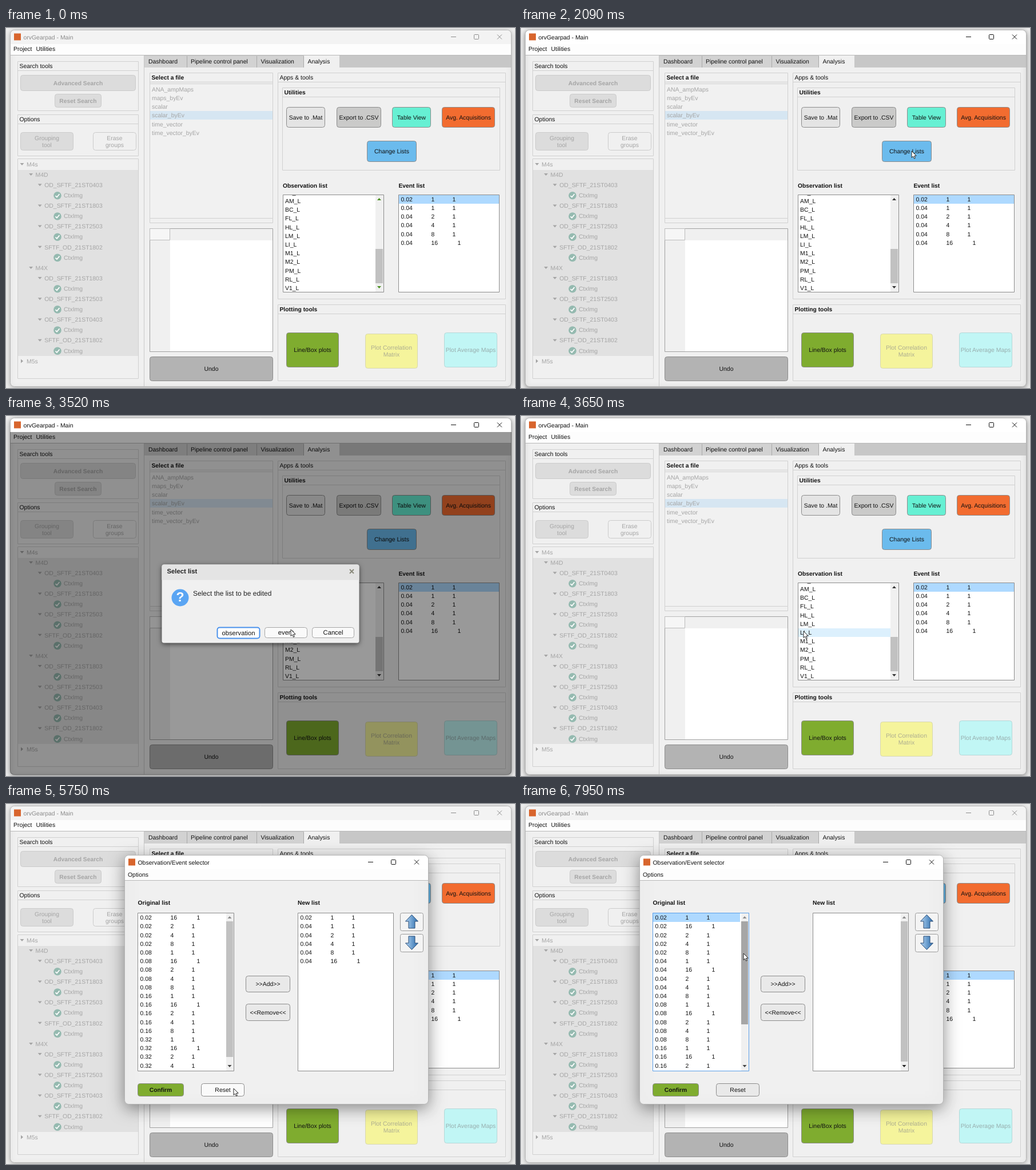
An HTML page with a canvas for the animation above (8000 ms loop, 890 by 629 pixels).

```html
<!DOCTYPE html>
<html lang="en">
<head>
<meta charset="utf-8">
<style>
html, body { margin: 0; width: 100%; height: 100%; overflow: hidden; background: #eee; }
canvas { display: block; }
</style>
</head>
<body>
<canvas id="stage" width="890" height="629"></canvas>
<script>
const ctx = document.getElementById('stage').getContext('2d');
const LOOP = 8000, ROW = 15.2, STEP = 1000 / 15;
const FONT = '"Liberation Sans", Arial, sans-serif';
const GREY = '#a5a5a5', LINE = '#d0d0d0', EDGE = '#8c8c8c', BODY = '#f0f0f0';
const PICKED = '#aed9ff', HOVER = '#dcf0fd', GREEN = '#7fac2f';

// Moments at which the interface changes
const ACTIVE = 2090, ASK = 2230, ANSWER = 3650, OPEN = 3860, RESET_FOCUS = 5950,
      RESET = 6020, PICK = 7220, SCROLL = 7950;

// Pointer path: time, x, y
const path = [
  [560, 726, 612], [760, 724, 452], [900, 721, 360], [1020, 718, 312], [1085, 716, 294],
  [1285, 702, 229], [1485, 683, 215], [2420, 683, 215], [2700, 640, 258], [3000, 566, 325],
  [3240, 515, 363], [3550, 494, 376], [4200, 494, 376], [4480, 556, 195], [4660, 535, 101],
  [5010, 432, 356], [5400, 418, 420], [5680, 398, 497], [5880, 390, 496], [6370, 390, 496],
  [6680, 279, 428], [6750, 278, 424], [7200, 295, 322], [7285, 305, 328], [SCROLL, 305, 328]
];

function pointerAt(time) {
  if (time >= SCROLL) return [389, 261];
  if (time < 555) return [-99, -99];
  const t = Math.max(path[0][0], Math.floor((time - 20) / STEP) * STEP + 20);
  const i = Math.max(1, path.findIndex(p => p[0] >= t));
  const [t0, x0, y0] = path[i - 1], [t1, x1, y1] = path[i];
  const k = (t - t0) / (t1 - t0);
  return [Math.round(x0 + (x1 - x0) * k), Math.round(y0 + (y1 - y0) * k)];
}

function text(s, x, y, { color = '#111', bold = false, align = 'left', size = bold ? 10.3 : 10.45 } = {}) {
  ctx.font = `${bold ? 'bold ' : ''}${size}px ${FONT}`;
  ctx.textAlign = align;
  ctx.textRendering = 'geometricPrecision';
  ctx.fillStyle = color;
  ctx.fillText(s, x, y + 3.7);
}

function fill(x0, y0, x1, y1, color) {
  ctx.fillStyle = color;
  ctx.fillRect(x0, y0, x1 - x0, y1 - y0);
}

function box(x0, y0, x1, y1, color, edge = LINE, radius = 0, width = 1) {
  ctx.beginPath();
  ctx.roundRect(x0 + .5, y0 + .5, x1 - x0 - 1, y1 - y0 - 1, radius);
  if (color) { ctx.fillStyle = color; ctx.fill(); }
  if (edge) { ctx.strokeStyle = edge; ctx.lineWidth = width; ctx.stroke(); }
}

function poly(points, color, edge, width = 1) {
  ctx.beginPath();
  points.forEach(([x, y]) => ctx.lineTo(x, y));
  ctx.closePath();
  if (color) { ctx.fillStyle = color; ctx.fill(); }
  if (edge) { ctx.strokeStyle = edge; ctx.lineWidth = width; ctx.stroke(); }
}

function stroke(color, width, ...lines) {
  ctx.beginPath();
  for (const [first, ...rest] of lines) {
    ctx.moveTo(...first);
    rest.forEach(p => ctx.lineTo(...p));
  }
  ctx.strokeStyle = color;
  ctx.lineWidth = width;
  ctx.stroke();
}

function button(label, x0, y0, x1, y1, color, { edge = EDGE, width, ...style } = {}) {
  box(x0, y0, x1, y1, color, edge, 4, width);
  const lines = label.split('\n');
  lines.forEach((s, i) => text(s, (x0 + x1) / 2, (y0 + y1) / 2 + (i - (lines.length - 1) / 2) * 12,
    { align: 'center', ...style }));
}

function panel(title, x0, y0, x1, y1, bold) {
  box(x0, y0, x1, y1, null);
  fill(x0, y0 + 16, x1, y0 + 17, LINE);
  text(title, x0 + 3.5, y0 + 8.5, { bold });
}

function frame(x0, y0, x1, y1, title, active, menuY, blur) {
  ctx.save();
  ctx.shadowColor = `rgba(0,0,0,${active ? .42 : .25})`;
  ctx.shadowBlur = blur;
  ctx.shadowOffsetY = blur / 4;
  box(x0, y0, x1, y1, BODY, '#b4b4b4', 7);
  ctx.restore();
  ctx.save();
  ctx.beginPath();
  ctx.roundRect(x0 + 1, y0 + 1, x1 - x0 - 2, y1 - y0 - 2, 7);
  ctx.clip();
  fill(x0, y0, x1, y0 + 25, active ? '#fff' : '#f3f3f3');
  fill(x0, y0 + 25, x1, menuY, '#fdfdfd');
  fill(x0, menuY, x1, menuY + 1, '#b8b8b8');
  ctx.restore();
  const y = y0 + 12.5, ink = active ? '#111' : '#8b8b8b', cx = x1 - 21;
  fill(x0 + 7, y - 6, x0 + 19, y + 6, '#d8652d');
  text(title, x0 + 23.5, y + .5, { color: ink });
  stroke(ink, 1, [[cx - 85, y], [cx - 76, y]], [[cx - 4, y - 4], [cx + 4, y + 4]], [[cx + 4, y - 4], [cx - 4, y + 4]]);
  box(cx - 45, y - 4.5, cx - 36, y + 4.5, null, ink, 1);
}

const triangle = (x, y, dir, color) => poly([[x - 3.5, y - 2 * dir], [x + 3.5, y - 2 * dir], [x, y + 2 * dir]], color);

function scrollbar(x0, y0, x1, y1, from, to, up, down, thumb = '#c1c1c1') {
  fill(x0, y0, x1, y1, BODY);
  fill(x0, from, x1 - 1, to, thumb);
  triangle((x0 + x1) / 2 - .5, y0 + 7, -1, up);
  triangle((x0 + x1) / 2 - .5, y1 - 8, 1, down);
}

function eventRow([level, rate, flag], x, y) {
  text(level, x, y);
  text(rate, x + 53, y);
  text(flag, x + (rate > 9 ? 99 : 90), y);
}

function listRows(rows, x0, x1, top, pointer, picked, draw) {
  const [px, py] = pointer, hovered = px >= x0 && px < x1 ? Math.floor((py - top) / ROW) : -1;
  rows.forEach((row, i) => {
    const y = top + i * ROW, color = i === picked ? PICKED : i === hovered ? HOVER : null;
    if (color) fill(x0, Math.round(y), x1, Math.round(y + ROW), color);
    draw(row, x0 + 3.5, y + ROW / 2);
  });
}

const rates = [1, 16, 2, 4, 8];
const allEvents = ['0.02', '0.04', '0.08', '0.16', '0.32'].flatMap(level => rates.map(rate => [level, rate, 1]));
const newEvents = [['0.02', 1, 1], ...[1, 2, 4, 8, 16].map(rate => ['0.04', rate, 1])];
const restEvents = allEvents.filter(([level, rate]) => level !== '0.04' && !(level === '0.02' && rate === 1));
const areas = ['AM', 'BC', 'FL', 'HL', 'LM', 'LI', 'M1', 'M2', 'PM', 'RL', 'V1'].map(s => s + '_L');
const files = ['ANA_ampMaps', 'maps_byEv', 'scalar', 'scalar_byEv', 'time_vector', 'time_vector_byEv'];

const sessions = dates => [...dates.map(d => 'OD_SFTF_21ST' + d), 'SFTF_OD_21ST1802']
  .flatMap(s => [[2, s], [3, 'CtxImg']]);
const tree = [[0, 'M4s'], [1, 'M4D'], ...sessions(['0403', '1803', '2503']),
  [1, 'M4X'], ...sessions(['1803', '2503', '0403']), [0, 'M5s']];

function sidebar() {
  const off = { color: GREY, edge: '#cbcbcb' };
  panel('Search tools', 20, 58, 232, 145);
  button('Advanced Search', 25, 82, 227, 110, '#dcdcdc', { ...off, bold: true });
  button('Reset Search', 85, 115, 167, 139, '#dcdcdc', { ...off, bold: true });
  panel('Options', 20, 151, 232, 224);
  button('Grouping\ntool', 25, 182, 118, 214, '#dcdcdc', off);
  button('Erase\ngroups', 152, 182, 228, 214, BODY, off);
  box(20, 228, 232, 613, BODY);
  fill(21, 248, 231, 573, '#e1e1e1');
  tree.forEach(([depth, label], i) => {
    const y = 238 + i * 18.1, x = 28 + depth * 15.6;
    if (depth === 3) {
      ctx.beginPath();
      ctx.arc(90, y + .5, 6.8, 0, 7);
      ctx.fillStyle = '#95bab0';
      ctx.fill();
      stroke('#fff', 1.7, [[86.5, y + .8], [89, y + 3.2], [93.5, y - 2.3]]);
      text(label, 101, y, { color: GREY });
      return;
    }
    if (label === 'M5s') poly([[26, y - 3.5], [30, y], [26, y + 3.5]], GREY);
    else triangle(x, y, 1, GREY);
    text(label, x + 8, y, { color: GREY });
  });
}

function mainWindow(t, pointer) {
  frame(7, 3, 884, 627, 'orvGearpad - Main', t >= ACTIVE && t < OPEN, 47, 8);
  text('Project', 13, 36.5);
  text('Utilities', 52.5, 36.5);
  sidebar();

  fill(241, 48, 883, 69, '#c7c7c7');
  fill(241, 69, 242, 626, '#c8c8c8');
  fill(242, 49, 521, 69, '#d2d2d2');
  fill(521, 48, 583, 70, BODY);
  [316, 438, 520].forEach(x => fill(x, 49, x + 1, 69, '#a9a9a9'));
  [['Dashboard', 249], ['Pipeline control panel', 323], ['Visualization', 445.5], ['Analysis', 527.5]]
    .forEach(([s, x]) => text(s, x, 58.5));

  panel('Select a file', 251, 78, 467, 341, true);
  box(251, 97, 467, 333, '#f1f1f1');
  fill(252, 145, 466, 160, '#d6e6f2');
  files.forEach((s, i) => text(s, 255, 107 + i * ROW, { color: GREY }));

  box(251, 350, 467, 566, '#fff', '#a0a0a0');
  fill(252, 351, 466, 371, BODY);
  fill(252, 371, 287, 565, BODY);
  box(251, 350, 287, 371, '#f6f6f6', '#bcbcbc');
  button('Undo', 251, 574, 467, 617, '#b3b3b3');

  panel('Apps & tools', 475, 78, 874, 474);
  panel('Utilities', 483, 104, 864, 249, true);
  button('Save to .Mat', 490, 138, 558, 174, '#e4e4e4');
  button('Export to .CSV', 578, 138, 656, 174, '#cacac9');
  button('Table View', 675, 138, 743, 174, t < OPEN ? '#66f0d3' : '#6bbbed');
  button('Avg. Acquisitions', 762, 138, 855, 174, '#f26c30');
  button('Change Lists', 631, 197, 718, 234, '#6bbbed');

  text('Observation list', 484, 275, { bold: true });
  text('Event list', 686.5, 275, { bold: true });
  box(484, 291, 661, 462, '#fff', EDGE);
  ctx.save();
  ctx.beginPath();
  ctx.rect(485, 292, 175, 169);
  ctx.clip();
  listRows(['AL_L', ...areas], 484.5, 646, 279.5, pointer, -1, (s, x, y) => text(s, x, y));
  const arrow = t < ACTIVE ? '#4b9021' : '#333';
  scrollbar(646, 292, 660, 461, 386, 446, arrow, arrow);
  ctx.restore();
  box(686, 291, 863, 462, '#fff', EDGE);
  listRows(newEvents, 687, 862, 291.5, pointer, 0, eventRow);

  panel('Plotting tools', 475, 483, 874, 617, true);
  button('Line/Box plots', 490, 532, 582, 593, GREEN);
  button('Plot Correlation\nMatrix', 628, 534, 720, 595, '#f5f49c', { color: '#adad90', edge: '#d8d8b0' });
  button('Plot Average Maps', 766, 532, 859, 593, '#c1f6f5', { color: '#98aeae', edge: '#b5d8d8' });
}

function question() {
  ctx.save();
  ctx.beginPath();
  ctx.roundRect(7, 28, 877, 599, [0, 0, 7, 7]);
  ctx.fillStyle = 'rgba(0,0,0,.4)';
  ctx.fill();
  ctx.shadowColor = 'rgba(0,0,0,.6)';
  ctx.shadowBlur = 9;
  ctx.shadowOffsetY = 2;
  box(272, 259, 618, 397, BODY, null, 4);
  ctx.restore();
  ctx.beginPath();
  ctx.roundRect(272.5, 259.5, 345, 27, [4, 4, 0, 0]);
  ctx.fillStyle = '#e4e4e4';
  ctx.fill();
  text('Select list', 281.5, 271.5, { bold: true, size: 11.3, color: '#222' });
  stroke('#8b8b7d', 2, [[601, 268], [608, 275]], [[608, 268], [601, 275]]);
  ctx.beginPath();
  ctx.arc(304.5, 317.5, 15, 0, 7);
  ctx.fillStyle = '#5aa5f3';
  ctx.fill();
  text('?', 304.5, 320.5, { bold: true, size: 23, color: '#fff', align: 'center' });
  text('Select the list to be edited', 327, 310, { size: 12, color: '#222' });
  button('observation', 369, 369, 444, 389, '#fff', { size: 11.2, edge: '#4b92ec', width: 2 });
  button('event', 452, 369, 527, 388, '#fafafa', { size: 11.2, edge: '#a6a6a6' });
  button('Cancel', 535, 369, 609, 388, '#fafafa', { size: 11.2, edge: '#a6a6a6' });
}

function moveButton(y, dir) {
  box(689, y, 730, y + 32, '#f4f4f4', '#9b9b9b', 3);
  const cy = y + 15.5, at = (x, dy) => [709.5 + x, cy + dy * dir];
  const shade = ctx.createLinearGradient(700, 0, 720, 0);
  shade.addColorStop(0, '#a9cdee');
  shade.addColorStop(1, '#2f6fae');
  poly([at(0, -12), at(11, -.5), at(5.5, -.5), at(5.5, 11.5), at(-5.5, 11.5), at(-5.5, -.5), at(-11, -.5)],
    shade, '#2b4d77');
}

function selector(t, pointer) {
  const cleared = t >= RESET, picked = t >= SCROLL ? 0 : t >= PICK ? 9 : -1;
  frame(207, 89, 739, 525, 'Observation/Event selector', true, 133, 28);
  text('Options', 213, 123);
  text('Original list', 230.5, 172, { bold: true });
  text('New list', 510, 172, { bold: true });

  box(230, 190, 399, 467, '#fff', t >= PICK ? '#5b9fe8' : EDGE);
  listRows((cleared ? allEvents : restEvents).slice(0, 18), 231, 383, 190.9, t >= PICK ? [-9, -9] : pointer, picked, eventRow);
  scrollbar(385, 191, 398, 466, 205, cleared ? 385 : 442, '#8c8c8c', '#444', t >= SCROLL ? '#a6a6a6' : '#c1c1c1');

  box(510, 190, 678, 467, '#fff', EDGE);
  if (cleared) scrollbar(664, 191, 677, 466, 205, 450, '#8c8c8c', '#222');
  else listRows(newEvents, 511, 677, 190.9, pointer, -1, eventRow);

  moveButton(190, 1);
  moveButton(227, -1);
  button('>>Add>>', 419, 300, 497, 329, '#e9e9e9');
  button('<<Remove<<', 419, 349, 497, 379, '#e9e9e9');
  button('Confirm', 230, 488, 311, 511, GREEN, { bold: true });
  const focused = t >= RESET_FOCUS && t < PICK, over = t > 5650 && t < RESET_FOCUS;
  button('Reset', 341, 488, 417, 511, focused ? '#e6eaef' : over ? '#fafafa' : '#e9e9e9',
    { edge: focused ? '#6aaaf0' : EDGE });
}

function cursor([x, y]) {
  const shape = [[0, 0], [0, 11.5], [2.6, 9.1], [4.5, 13.2], [6.4, 12.3], [4.6, 8.4], [8.2, 8.2]];
  poly(shape.map(([dx, dy]) => [x + dx, y + dy]), '#fff', '#222');
}

function draw(t) {
  const pointer = pointerAt(t), lagging = pointerAt(t - 70), nowhere = [-9, -9];
  const asking = t >= ASK && t < ANSWER, opened = t >= OPEN;
  fill(0, 0, 890, 629, '#eee');
  mainWindow(t, asking || opened ? nowhere : lagging);
  if (asking) question();
  if (opened) {
    ctx.globalAlpha = t < OPEN + 70 ? .6 : 1;
    selector(t, lagging);
    ctx.globalAlpha = 1;
  }
  cursor(pointer);
}

function tick() {
  draw(performance.now() % LOOP);
  requestAnimationFrame(tick);
}
tick();
</script>
</body>
</html>
```
